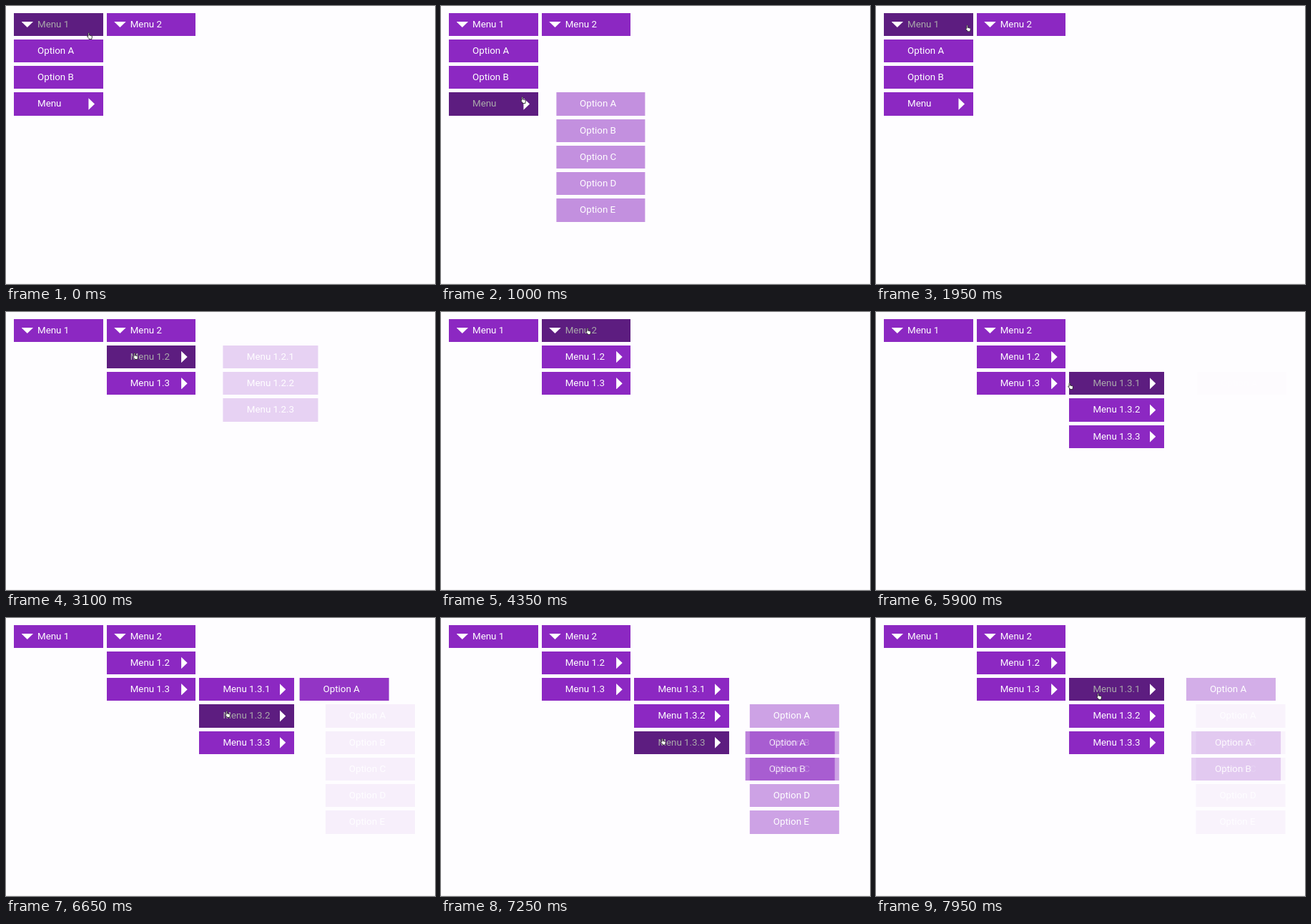
These frames come from a looping animation (600 px wide and 390 px high, 8000 ms). An HTML page:

```html
<!DOCTYPE html>
<html lang="en">
<head>
<meta charset="utf-8">
<title>Nested hover menu</title>
<style>
html, body { margin: 0; width: 100%; height: 100%; overflow: hidden; background: #fefdff; }
body { position: relative; font: 13.333px Roboto, Arial, sans-serif; color: #fff; }
ul { list-style: none; margin: 0; padding: 0; position: absolute; }
li { position: relative; width: 124.6px; height: 32.2px; margin-bottom: 5.1px; }
.wide > li { width: 132.5px; }
.bar { left: 11px; top: 9.5px; display: flex; gap: 5.1px; }
.bar > li > ul { left: 0; top: 37.3px; }
.bar ul ul { left: calc(100% + 5.1px); top: 0; }
.label { height: 100%; padding-left: 33px; line-height: 32.2px; background: #8c28c2; white-space: nowrap; }
.hover > .label { background: #5d1d80; color: #aaa; }
.down, .right { position: absolute; background: #fff; }
.down { left: 10.5px; top: 12.5px; width: 16.5px; height: 8px; clip-path: polygon(0 0, 100% 0, 50% 100%); }
.right { right: 11.6px; top: 8px; width: 8.6px; height: 16.4px; clip-path: polygon(0 0, 100% 50%, 0 100%); }
.floor { position: absolute; left: 0; right: 0; bottom: 0; height: 1px; background: #f2f0f3; }
#cursor { position: absolute; left: -4px; top: -5px; width: 8px; height: 10px; }
</style>
</head>
<body>
<div class="floor"></div>
<svg id="cursor" viewBox="0 0 16 20">
  <path d="M4 11V3Q4 1 5.5 1T7 3V8L13 9.5Q15 10 15 12L14 16V19H6V17L1.5 12Q1 10 2.5 10Z"
        fill="#fff" stroke="#222" stroke-width="1.7" stroke-linejoin="round"/>
</svg>
<script>
const LOOP = 8000, FADE = 350, SLIDE = 41.5;

const options = letters => [...letters].map(letter => ['Option ' + letter]);
const menu = [
  ['Menu 1', [...options('AB'), ['Menu', options('ABCDE')]]],
  ['Menu 2', [
    ['Menu 1.2', [['Menu 1.2.1'], ['Menu 1.2.2'], ['Menu 1.2.3']]],
    ['Menu 1.3', [
      ['Menu 1.3.1', options('A')],
      ['Menu 1.3.2', options('ABCDE')],
      ['Menu 1.3.3', options('AB')]
    ]]
  ]]
];

// Start time and path of the item under the pointer.
const hovers = [
  [0, '0'], [170, '0.0'], [450, '0.1'], [823, '0.2'],
  [1520, '0.1'], [1630, '0.0'], [1760, '0'], [2050, '1'],
  [3033, '1.0'], [3985, '1'], [4600, '1.0'], [5330, '1.1'],
  [5900, '1.1.0'], [6629, '1.1.1'], [7050, '1.1.2'],
  [7672, '1.1.1'], [7820, '1.1.0']
];

// Time, x, y of the pointer.
const track = [
  [0, 117, 42], [170, 117, 51], [450, 117, 89], [823, 116, 126], [1000, 115, 132],
  [1300, 115, 138], [1450, 115, 134], [1520, 116, 121], [1630, 117, 84], [1760, 119, 46],
  [1900, 122, 32], [2050, 142, 30], [2500, 181, 34], [2850, 181, 34], [3033, 181, 51],
  [3100, 181, 62], [3400, 190, 68], [3800, 204, 66], [3950, 204, 66], [3990, 204, 46],
  [4350, 206, 27], [4600, 207, 51], [5000, 208, 76], [5300, 208, 85], [5600, 215, 102],
  [5900, 272, 104], [6200, 308, 104], [6550, 309, 112], [6629, 310, 126], [6650, 310, 135],
  [6800, 310, 145], [7050, 310, 163], [7300, 311, 176], [7500, 311, 178], [7672, 311, 158],
  [7820, 312, 121], [7950, 312, 110], [8000, 312, 108]
];

const items = [];
const add = (parent, tag, className = '', text = '') => {
  const el = parent.appendChild(document.createElement(tag));
  el.className = className;
  el.textContent = text;
  return el;
};

function build(parent, entries, prefix = '') {
  const wide = /\d\.\d\.\d/.test(entries[0][0]);
  const list = add(parent, 'ul', prefix ? (wide ? 'wide' : '') : 'bar');
  entries.forEach(([text, children], i) => {
    const path = prefix + i;
    const el = add(list, 'li');
    add(el, 'div', 'label', text);
    if (children) add(el, 'div', prefix ? 'right' : 'down');
    items.push({ path, el, sub: children && build(el, children, path + '.') });
  });
  return list;
}

build(document.body, menu);
const cursor = document.getElementById('cursor');
document.body.append(cursor);

const contains = (path, hovered) => (hovered + '.').startsWith(path + '.');

function openness(path, time) {
  let value = contains(path, hovers[0][1]) ? 1 : 0;
  hovers.forEach(([start, hovered], i) => {
    if (start >= time) return;
    const end = Math.min(time, i + 1 < hovers.length ? hovers[i + 1][0] : LOOP);
    const step = (end - start) / FADE;
    value = Math.min(1, Math.max(0, value + (contains(path, hovered) ? step : -step)));
  });
  return value;
}

function pointerAt(time) {
  const i = track.findIndex(key => key[0] > time);
  const [t0, x0, y0] = track[i - 1], [t1, x1, y1] = track[i];
  const p = (time - t0) / (t1 - t0);
  return [x0 + (x1 - x0) * p, y0 + (y1 - y0) * p];
}

function render(time) {
  const hovered = hovers.filter(([start]) => start <= time).pop()[1];
  for (const { path, el, sub } of items) {
    el.classList.toggle('hover', path === hovered);
    if (!sub) continue;
    const open = openness(path, time);
    sub.style.opacity = open;
    sub.style.transform = open < 1 ? `translateX(${SLIDE * (1 - open)}px)` : 'none';
  }
  const [x, y] = pointerAt(time);
  cursor.style.transform = `translate(${x}px, ${y}px)`;
}

const origin = performance.now();
function frame() {
  render((performance.now() - origin) % LOOP);
  requestAnimationFrame(frame);
}
frame();
</script>
</body>
</html>
```
